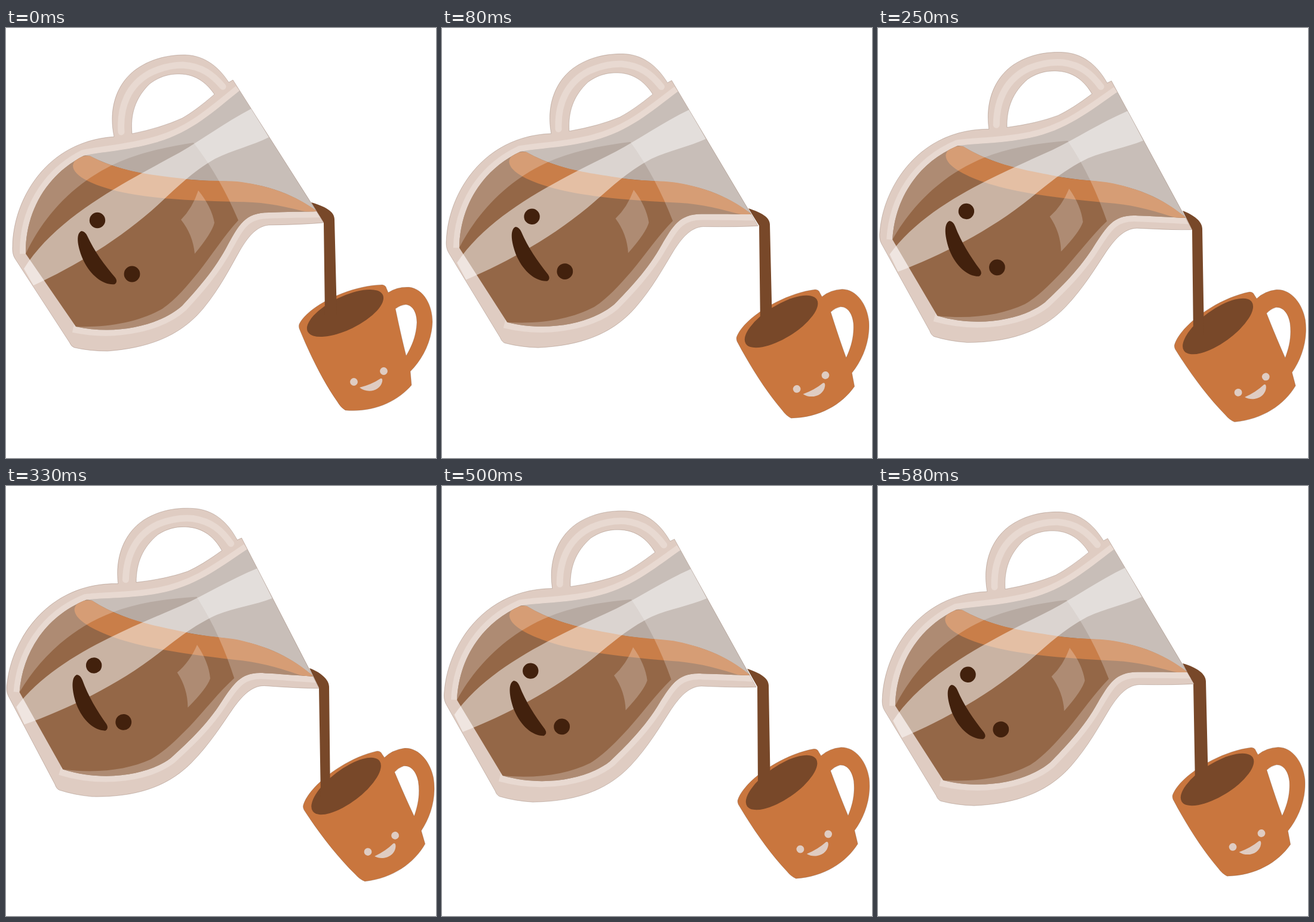
An HTML page for the animation above (0.66 s loop, 720 px wide and 720 px high).

```html
<!DOCTYPE html>
<html lang="en">
<head>
<meta charset="utf-8">
<title>Pouring coffee</title>
<style>
  html, body { margin: 0; width: 100%; height: 100%; overflow: hidden; background: #fff; }
  svg { display: block; width: 100vw; height: 100vh; }
  .rim { fill: #dfccc2; }
  .shine { fill: none; stroke: #e8d9d1; }
  .coffee { fill: #784829; }
  .face { fill: #42210d; }
  .edge { fill: none; stroke: #6b4a3a; stroke-width: .7; stroke-opacity: .4; }
</style>
</head>
<body>
<svg viewBox="0 0 720 720">
  <defs>
    <path id="body" d="M380 87L532 326Q500 329 440 330C418 332 404 352 392 372C375 402 358 436 330 470
      C290 518 235 536 170 541Q140 541 114 535Q109 533 106 526L15 386Q10 378 11 365C12 290 65 190 181 182
      C172 140 182 98 214 72C240 52 270 45 300 45C335 46 358 68 373 91Z
      M211 177C208 145 216 118 240 94C258 80 275 77 290 77C320 77 338 95 349 111Q318 138 295 151Q260 167 211 177Z"
      clip-rule="evenodd" fill-rule="evenodd"/>
    <path id="glass" d="M33 378C32 312 64 248 130 214C160 207 200 206 250 192C310 175 345 142 391 105L520 307
      C490 308 460 308 440 309C400 309 390 330 372 362C350 405 318 440 295 465C262 495 190 516 117 500Z"/>
    <path id="mugShape" d="M491 496C505 466 575 431 630 430Q636 431 637 436L640 443Q655 433 675 434
      C700 437 714 465 714 492C713 525 697 555 677 575L679 598C655 626 615 644 568 640Q560 635 555 626
      C530 590 508 545 491 503Q490 499 491 496Z
      M652 470Q660 464 669 463C682 464 688 478 688 493C687 515 680 532 670 549Q662 518 652 470Z"
      fill-rule="evenodd"/>
    <clipPath id="inBody"><use href="#body"/></clipPath>
    <clipPath id="inGlass"><use href="#glass"/></clipPath>
  </defs>

  <g id="mug">
    <use href="#mugShape" fill="#c9763e"/>
    <use href="#mugShape" class="edge"/>
    <ellipse class="coffee" rx="70" ry="27.7" transform="translate(568 477.5) rotate(-26)"/>
    <g class="rim">
      <circle cx="582.5" cy="592.5" r="6.4"/>
      <circle cx="632.5" cy="574.5" r="6.4"/>
      <path d="M592 602Q612 597 627 587Q631 586 630 592C626 609 604 612 592 602Z"/>
    </g>
  </g>

  <path id="stream" class="coffee"/>

  <g id="jug">
    <use href="#body" class="rim"/>
    <path class="shine" stroke-width="11" stroke-linecap="round"
      d="M193 174C190 130 206 95 240 76C262 65 280 62 296 62C328 64 346 78 363 98"/>
    <g clip-path="url(#inBody)">
      <path class="shine" stroke-width="20"
        d="M33 378C32 312 64 248 130 214C160 207 200 206 250 192C310 175 345 142 391 105"/>
      <path class="shine" stroke-width="20"
        d="M531 307C490 308 460 308 440 309C400 309 390 330 372 362C350 405 318 440 295 465C262 495 190 516 113 500"/>
    </g>
    <g clip-path="url(#inGlass)">
      <path fill="#b7aaa2" d="M0 80H540V560H0Z"/>
      <path fill="#946747" d="M0 200L140 214C200 245 270 252 340 256C430 256 475 275 521 307V540H0Z"/>
      <path fill="#c97e49" d="M140 214C195 244 265 248 310 254C345 257 375 255 395 258C445 265 488 282 521 307
        Q511 310 495 306C455 296 425 291 385 291C300 289 230 285 178 271C138 260 112 246 112 230Q115 214 140 214Z"/>
      <path fill="#fff" fill-opacity=".24" fill-rule="evenodd" d="M0 80H540V560H0Z
        M33 378C62 317 112 258 190 224C230 207 270 199 314 192C345 232 369 275 389 322C365 348 345 380 322 409
        C303 432 285 454 262 470C225 491 175 502 117 500Z"/>
    </g>
    <path fill="#fff" fill-opacity=".24" d="M322 272Q344 299 349 326Q345 343 316 378Q313 346 293 321Q312 302 322 272Z"/>
    <path fill="#fff" fill-opacity=".5" clip-path="url(#inBody)"
      d="M411 135C365 159 330 186 290 209C200 258 85 315 30 403L46 431C115 399 195 352 260 291
      C290 263 315 239 350 219C380 204 412 197 440 183Z"/>
    <g class="face">
      <circle cx="153" cy="322" r="13.2"/>
      <circle cx="211" cy="412" r="13.4"/>
      <path d="M126 340Q132 340 136 348C148 374 165 397 183 418Q188 425 182 429C164 431 143 416 130 390
        C120 368 116 345 126 340Z"/>
    </g>
    <use href="#body" class="edge"/>
  </g>
</svg>
<script>
  // jug and mug: [angle, dx, dy]
  // stream: [top x, y, bend x, y, bottom right x, bottom left x, bottom y, lip x, y]
  const rest   = { jug: [0, 0, 0],        mug: [0, 0, 0],        stream: [511, 292, 550, 320, 554, 534, 480, 532, 326] };
  const tilt   = { jug: [1.75, -1, -1],   mug: [-5.8, 0, 14],    stream: [513, 302, 549, 329, 553, 533, 500, 531, 331] };
  const lean   = { jug: [3.5, -2, -2],    mug: [-8.5, .5, 19],   stream: [511, 306, 547, 334, 550, 529, 508, 528, 336] };
  const deep   = { jug: [4.05, -2, -3],   mug: [-9.9, 1, 22],    stream: [510, 306, 543, 336, 546, 528, 514, 526, 338] };
  const full   = { jug: [5.2, -2, -6],    mug: [-11.1, 1.5, 25], stream: [508, 305, 541, 336, 543, 527, 521, 524, 338] };
  const settle = { ...tilt, stream: [510, 297, 549, 327, 553, 531, 500, 528, 331] };

  const poses = [rest, tilt, lean, deep, full, deep, lean, settle];
  const starts = [0, 80, 170, 250, 330, 420, 500, 580];
  const LOOP = 660;
  const [jug, mug, stream] = ["jug", "mug", "stream"].map(id => document.getElementById(id));

  function place(part, [angle, dx, dy], cx, cy) {
    part.setAttribute("transform", `translate(${dx} ${dy}) rotate(${angle} ${cx} ${cy})`);
  }

  function streamPath([x, y, bendX, bendY, right, left, bottom, lipX, lipY]) {
    return `M${x} ${y}C${bendX - 14} ${y + 7} ${bendX} ${bendY - 12} ${bendX} ${bendY}` +
      `L${right} ${bottom}H${left}L${lipX} ${lipY}Z`;
  }

  function draw(now) {
    const time = now % LOOP;
    const pose = poses[starts.findLastIndex(start => start <= time)];
    place(jug, pose.jug, 322, 272);
    place(mug, pose.mug, 568, 477);
    stream.setAttribute("d", streamPath(pose.stream));
  }

  const begin = performance.now();
  function tick() {
    draw(performance.now() - begin);
    requestAnimationFrame(tick);
  }
  tick();
</script>
</body>
</html>
```
